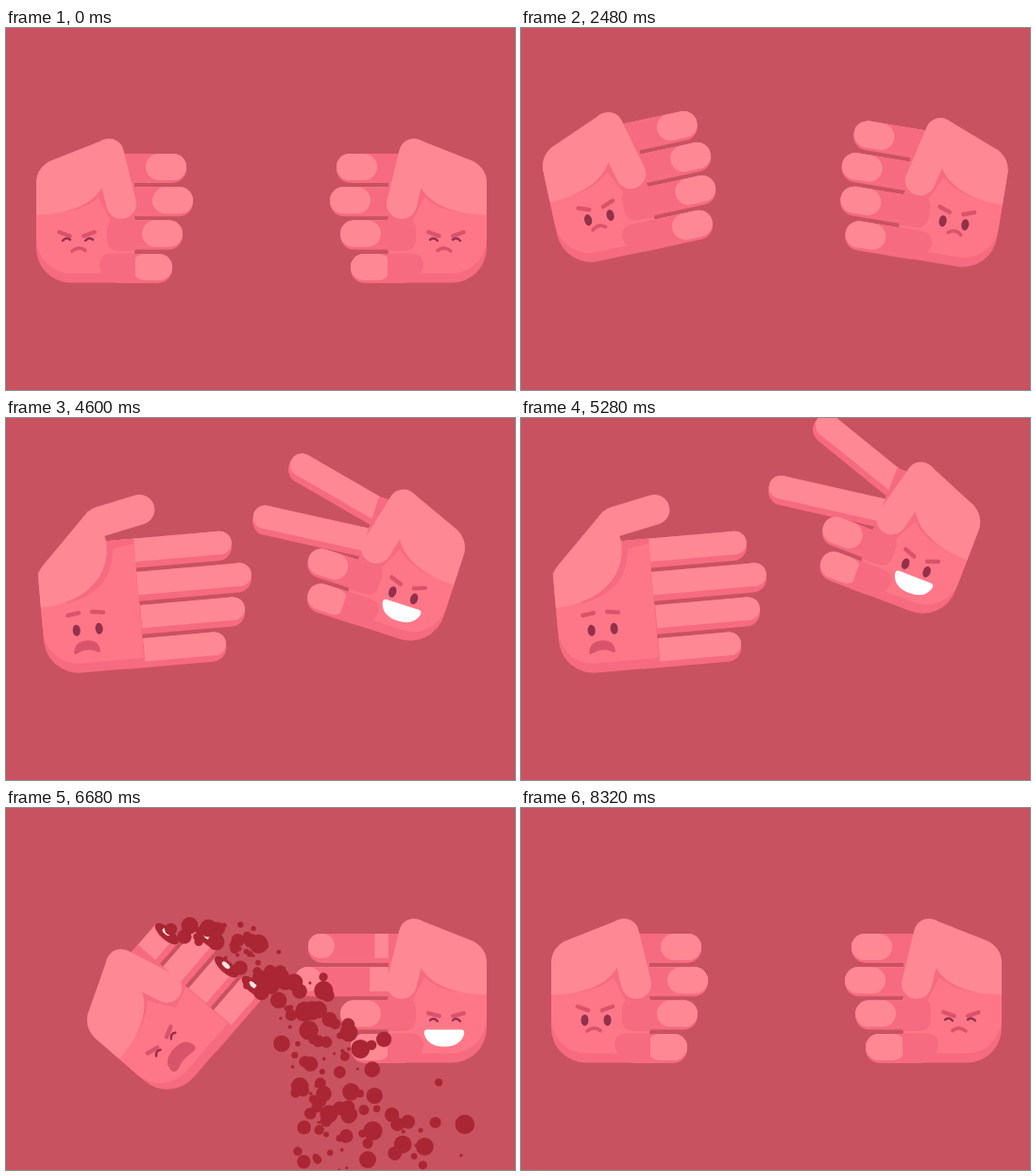
An HTML page that plays this animation: 539 px wide and 383 px high, repeating every 8.36 s.

```html
<!DOCTYPE html>
<html lang="en">
<head>
<meta charset="utf-8">
<title>Rock, paper, scissors</title>
<style>
html, body { margin: 0; width: 100%; height: 100%; overflow: hidden; background: #c95260; }
svg { display: block; width: 539px; height: 383px; }
</style>
</head>
<body>
<svg id="stage" viewBox="0 0 539 383"></svg>
<script>
const LOOP = 8360, CUT = 5540, GONE = 7700;
const ROUNDS = [100, 1490, 3130], PERIOD = 430;
const BACK = '#c95260', LIGHT = '#ff8895', PALM = '#fe7788', SHADE = '#f66b7f';
const LINE = '#d9536a', EYE = '#93304a', BLOOD = '#aa2634';
const FIST = [191, 198, 187, 176], OPEN = [239, 257, 247, 224], STUMP = [165, 190, 180, 183];
const FINGERS = [0, 1, 2, 3], top4 = i => 133 + 35.3 * i;
const stage = document.getElementById('stage');

const mix = (a, b, k) => a + (b - a) * k;
const mixAll = (a, b, k) => a.map((v, i) => mix(v, b[i], k));
const clamp = k => Math.min(1, Math.max(0, k));
// Smooth rise from 0 at time a to 1 at time b.
const step = (t, a, b) => (1 - Math.cos(Math.PI * clamp((t - a) / (b - a)))) / 2;
// Sum of weighted moves [weight, dx, dy, rot].
const blend = moves => [1, 2, 3].map(n => moves.reduce((sum, m) => sum + m[0] * m[n], 0));

let seed = 11;
const rnd = () => (seed = seed * 16807 % 2147483647) / 2147483647;
const range = (a, b) => mix(a, b, rnd());

// Two and a half swings of the fist; the last one of the second round is weaker.
function shake(t, right) {
  const n = t >= ROUNDS[2] ? 2 : t >= ROUNDS[1] ? 1 : 0;
  const k = clamp((t - ROUNDS[n]) / (2.5 * PERIOD));
  const size = n === 1 && k > .8 ? (right ? 10 : 13) : 18;
  return -size * Math.sin(5 * Math.PI * k);
}

const paper = t => step(t, 1020, 1140) - step(t, 1490, 1650) + step(t, 4010, 4130);

function leftPose(t) {
  const k = clamp((t - 7760) / 550);
  const rise = 300 * (1 - k) * Math.exp(-3 * k) * Math.cos(6 * k);
  const [dx, dy, rot] = t > GONE ? [0, rise, rise / 12] : blend([
    [Math.sin(Math.PI * step(t, 4110, 4440)), -20, 0, 0],
    [step(t, 4110, 4460), 5, -1, -5],
    [step(t, CUT, 5800), 3, 27, -1],
    [step(t, 6100, 6660), 64, 2, -43],
    [step(t, 6740, 7300), -32, 320, -11]]);
  const open = t > GONE ? 0 : paper(t);
  const thumb = t > GONE ? 0 : open - step(t, CUT, 5680);
  return { dx, dy, rot, bob: 0, swing: shake(t), open: [open, open, open, open], thumb,
    spread: 0, cut: t >= CUT && t < GONE };
}

function rightPose(t) {
  const [dx, dy, rot] = blend([
    [step(t, 4200, 4440), -33, -37, 18],
    [step(t, 4640, 5300), -1, -29, 3],
    [step(t, 5430, 5660), -59, 140, -41],
    [step(t, 6020, 6480), 93, -74, 20]]);
  const two = paper(t) - step(t, 6480, 6960), rest = t > 3000 ? 0 : two;
  const bob = t > 6300 && t < 7640 ? Math.sin((t - 6300) / 55) : 0;
  return { dx: -dx, dy, rot: -rot, bob, swing: shake(t, true),
    open: [two, two, rest, rest], thumb: rest, cut: false,
    spread: step(t, 4020, 4150) + .5 * step(t, 4640, 5300) - .5 * step(t, 5430, 5660) - step(t, 6050, 6400) };
}

const shaking = t => t < 40 || ROUNDS.some(r => t > r - 60 && t < r + 820);

function leftFace(t) {
  if (t >= CUT && t < GONE) return { brow: 18, closed: true, mouth: 'yell' };
  if (t > 4230 && t < CUT) return { brow: -8, mouth: 'sad', lift: 5 };
  if (t > 1050 && t < 1430) return { brow: -6, mouth: 'o', lift: 3 };
  return { brow: 20, closed: shaking(t), mouth: 'frown' };
}

function rightFace(t) {
  if (t >= CUT && t < 8120) return { brow: 15, closed: true, mouth: 'grin' };
  if (t > 4230 && t < CUT) return { brow: 20, mouth: 'grin' };
  return { brow: 20, closed: shaking(t) || t > 8100, mouth: 'frown' };
}

const rect = (x, y, w, h, r, fill) =>
  `<rect x="${x}" y="${y}" width="${Math.max(0, w)}" height="${h}" rx="${r}" fill="${fill}"/>`;
const path = (d, fill) => `<path d="${d}" fill="${fill}"/>`;
const line = (d, w, color) =>
  `<path d="${d}" fill="none" stroke="${color}" stroke-width="${w}" stroke-linecap="round"/>`;
const oval = (x, y, rx, ry, fill) =>
  `<ellipse cx="${x}" cy="${y}" rx="${rx}" ry="${ry}" fill="${fill}"/>`;

// A bent finger shows a dark gap between its base and its tip.
function finger(i, p) {
  const o = p.open[i], y = top4(i), up = Math.max(0, -p.swing) * (1 - o);
  const end = p.cut ? STUMP[i] : mix(FIST[i], OPEN[i], o) + up * (i < 2 ? .9 : 1.6);
  const h = mix(28, 24.5, o), gap = mix(105, end, o * o), tip = Math.max(28, 43 * (1 - o));
  let s = rect(105, y, end - 105, 31, p.cut ? 0 : 15, SHADE) +
    rect(105, y, end - 105, h, p.cut ? 0 : h / 2, LIGHT);
  if (p.cut) s += oval(end, y + 15.5, 6.5, 15.5, BLOOD) + oval(end + 1, y + 14, 2.5, 5, '#ffe3e3');
  else s += rect(gap, y, end - 14 - gap, h, 0, SHADE) + rect(end - tip, y, tip, h, h / 2, LIGHT);
  const bend = p.spread * [-12, 5.5, 0, 0][i];
  return `<g transform="rotate(${bend} 136 ${y + 15})">${s}</g>`;
}

// Curled finger base lying over the palm.
function knuckle(x0, y, h, o) {
  const x = mix(x0, 136, clamp(o * 1.3)), r = Math.min(13, 136 - x);
  return path(`M137 ${y}H${x + r}Q${x} ${y} ${x} ${y + r}V${y + h - r}Q${x} ${y + h} ${x + r} ${y + h}H137Z`, SHADE);
}

// k runs from folded (0) to stretched (1).
function thumb(k) {
  const s = mixAll([80, 193, 93, 184, 98, 179, 112, 207, 136, 201],
    [95, 191, 112, 168, 113, 142, 118, 141, 136, 138], k);
  const [corner, edge, joint, inner, tip] = [
    [[46, 141], [39, 152]], [[103, 118.5], [91, 99.5]], [[109, 133], [102, 112]],
    [[101, 170], [107, 133]], [[122, 186], [145, 103]]].map(([a, b]) => mixAll(a, b, k));
  const curve = mixAll([88, 190, 62, 197], [109, 172, 78, 196], k);
  return path(`M58 195C${s.slice(0, 6)}L${s.slice(6)}L136 133H104Z`, SHADE) +
    path(`M32 197.5V164Q32 ${mix(149, 159, k)} ${corner}L${edge}L${joint}L${inner}C${curve} 32 197.5Z`, LIGHT) +
    line(`M${joint}L${tip}`, 32, LIGHT);
}

const MOUTHS = {
  frown: line('M-7 -7Q0 -13 7 -7.5', 3.6, LINE),
  o: oval(-1, -3, 4, 2.2, LINE),
  sad: path('M-14 5Q-13 -7 0 -7Q13 -7 14 5Q14 8 9 5Q0 1 -9 5Q-14 8 -14 5Z', LINE),
  yell: path('M-18 4Q-17 -9 0 -9Q17 -9 18 4Q18 10 10 8Q0 5 -10 8Q-18 10 -18 4Z', LINE),
  grin: path('M-18 -9H18Q22 -9 21 -4Q17 9 0 9Q-17 9 -21 -4Q-22 -9 -18 -9Z', '#fff')
};

function face(f, bob) {
  const by = (f.closed ? 218 : 212) - (f.lift || 0);
  const brow = (x, a) => `<g transform="rotate(${a} ${x} ${by})">${line(`M${x - 6} ${by}h12`, 4.4, LINE)}</g>`;
  const eye = x => f.closed ? line(`M${x - 4} 225q4 -4.5 8 -1`, 2.4, EYE) : oval(x, 224.5, 4, 6, EYE);
  const cx = f.closed ? 76 : 79.5;
  return `<g transform="translate(0 ${bob})">` +
    brow(cx - 14, f.brow) + brow(cx + 12, -f.brow) + eye(cx - 12) + eye(cx + 12) +
    `<g transform="translate(77 243)">${MOUTHS[f.mouth]}</g></g>`;
}

function hand(p, f) {
  const body = y => `M32 160V${y - 37}A37 37 0 0 0 69 ${y}H136V133H100Z`;
  return `<g transform="translate(${p.dx} ${p.dy}) rotate(${p.rot} 84 200) rotate(${p.swing} -30 197)">` +
    FINGERS.map(i => finger(i, p)).join('') +
    path(body(269.5), SHADE) + path(body(259.5), PALM) +
    knuckle(107, 201, 35, p.open[2]) + knuckle(99, 238.5, 24, p.open[3]) +
    thumb(p.thumb) + face(f, p.bob) + '</g>';
}

// A point of the left hand in stage coordinates.
function place(x, y, p) {
  const a = p.rot * Math.PI / 180, c = Math.cos(a), s = Math.sin(a), u = x - 84, v = y - 200;
  return [84 + p.dx + u * c - v * s, 200 + p.dy + u * s + v * c];
}

// Severed tips fly off with [vx, vy, spin].
const THROW = [[340, 210, 200], [37, 26, 250], [160, 55, 70], [-66, -126, 60]];
function severed(t, i) {
  const s = (t - CUT) / 1000;
  if (s < 0 || s > 1.3) return '';
  const [x, y] = place((STUMP[i] + OPEN[i]) / 2, top4(i) + 15, leftPose(CUT));
  const [vx, vy, spin] = THROW[i], w = OPEN[i] - STUMP[i];
  return `<g transform="translate(${x + vx * s} ${y + vy * s + 450 * s * s}) rotate(${spin * s - 5})">` +
    rect(-w / 2, -15.5, w, 31, 14, SHADE) + rect(-w / 2, -15.5, w, 24.5, 12, LIGHT) + '</g>';
}

const drops = Array.from({ length: 260 }, (_, i) => {
  const splash = i < 14, born = CUT + (splash ? range(0, 80) : range(30, 1110));
  const n = Math.floor(rnd() * 4);
  const [x, y] = place(STUMP[n], top4(n) + range(4, 26), leftPose(born));
  return { born, x, y, r: 1.5 + (splash ? 5 : 9) * rnd() ** 1.5,
    vx: splash ? range(350, 620) : range(190, 370), vy: splash ? range(60, 280) : range(-140, 0) };
});

function blood(t) {
  return drops.map(d => {
    const s = (t - d.born) / 1000;
    const y = d.y + d.vy * s + 375 * s * s;
    return s < 0 || t > 7650 || y > 400 ? '' : oval(d.x + d.vx * s, y, d.r, d.r, BLOOD);
  }).join('');
}

function draw(t) {
  stage.innerHTML = rect(0, 0, 539, 383, 0, BACK) +
    hand(leftPose(t), leftFace(t)) + severed(t, 0) +
    `<g transform="translate(541 0) scale(-1 1)">${hand(rightPose(t), rightFace(t))}</g>` +
    severed(t, 3) + severed(t, 2) + severed(t, 1) + blood(t);
}

const start = performance.now();
function tick() {
  draw((performance.now() - start) % LOOP);
  requestAnimationFrame(tick);
}
tick();
</script>
</body>
</html>
```
